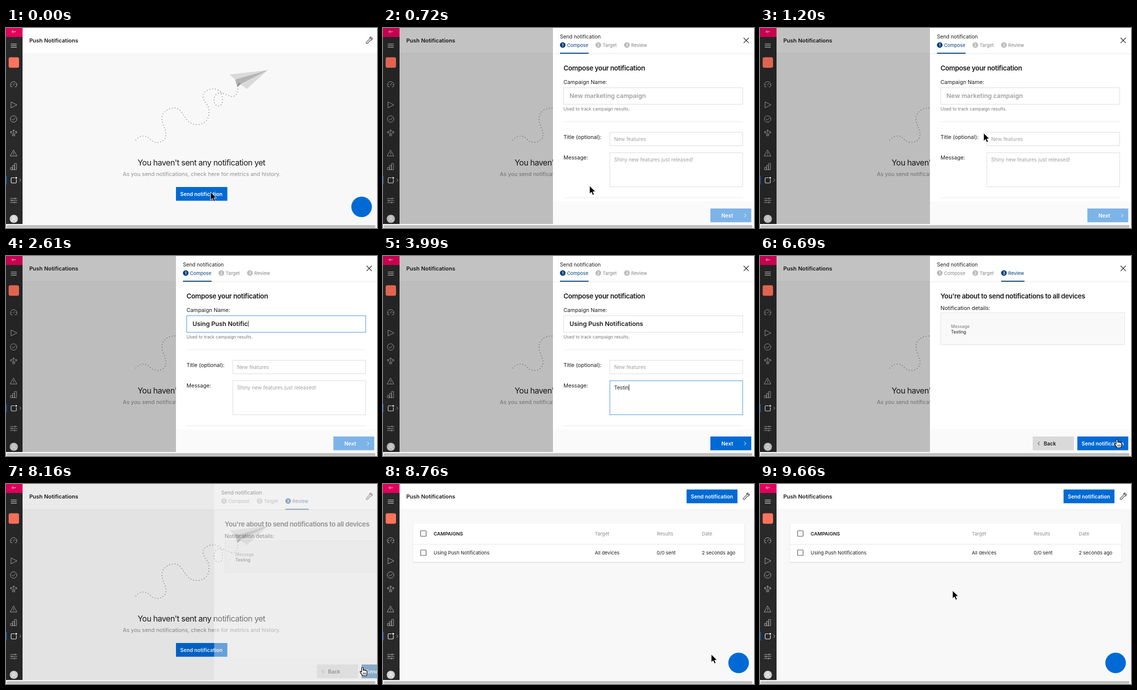
These frames come from a looping animation (740x400 px, 9.69 s). An HTML page:

```html
<!DOCTYPE html>
<html lang="en">
<head>
<meta charset="utf-8">
<title>Push Notifications</title>
<style>
  html, body { margin: 0; width: 100%; height: 100%; overflow: hidden; background: #fbfbfb; }
  svg { display: block; width: 740px; height: 400px; font-family: Inter, "Open Sans", sans-serif; }
  text { white-space: pre; }
  .line { fill: none; stroke-linecap: round; stroke-linejoin: round; }
</style>
</head>
<body>
<svg id="stage" viewBox="0 0 740 400"></svg>
<script>
const LOOP = 9690;
const BLUE = '#006ad4', DARK_BLUE = '#00417f', HOVER_BLUE = '#00539f', PALE_BLUE = '#7db4e8', FOCUS = '#4a98dc';
const INK = '#1c1c1c', GREY = '#8c8c8c', MUTED = '#777', PLACEHOLDER = '#a0a0a0', EDGE = '#dcdcdc';
const CAMPAIGN = 'Using Push Notifications', MESSAGE = 'Testing';

// Markup helpers
const text = (x, y, size, content, fill = INK, weight = 400, extra = '') =>
  `<text x="${x}" y="${y}" font-size="${size}" fill="${fill}" font-weight="${weight}" ${extra}>${content}</text>`;
const rect = (x, y, w, h, fill, extra = '') =>
  `<rect x="${x}" y="${y}" width="${w}" height="${h}" fill="${fill}" ${extra}/>`;
const circle = (x, y, r, fill, extra = '') => `<circle cx="${x}" cy="${y}" r="${r}" fill="${fill}" ${extra}/>`;
const line = (d, stroke, width = 1, extra = '') =>
  `<path class="line" d="${d}" stroke="${stroke}" stroke-width="${width}" ${extra}/>`;
const group = (id, content) => `<g id="${id}">${content}</g>`;
const box = (x, y, w, h, id = '') =>
  rect(x + .5, y + .5, w - 1, h - 1, '#fff', `stroke="${EDGE}" ${id && `id="${id}"`}`);
const button = (x, y, w, label, id = '') =>
  rect(x, y, w, 27.5, BLUE, id && `id="${id}"`) + text(x + 8.5, y + 17.6, 10.25, label, '#fff', 600);
const heading = (content, size = 13.4) =>
  text(360, 85.3, size, content, INK, 600, 'letter-spacing="-.36"');

function sidebar() {
  const icons = [
    'M10 117.5A6.5 6.5 0 1 1 20.5 117.5H18M15 114.5L17 110.5M10.5 113h1M19.5 113h1M12.5 117.5H10',
    'M10 148.2V159.8L21.5 154Z',
    'M12 182L14.4 184.4L18.6 179.6M21.7 182A6.5 6.5 0 1 1 8.7 182A6.5 6.5 0 1 1 21.7 182',
    'M15.2 216V204M13 206L15.2 203.6L17.4 206M13.2 216V213Q13 211 9.5 207.5M9.2 210.3V207.2H12.2M17.2 216V213Q17.5 211 21 207.5M18.3 207.2H21.3V210.3',
    'M15.2 244.3L21.8 256H8.6ZM15.2 248.5V252.3M15.2 254V254.2',
    'M9 283V279H13V283ZM13 283V275H17V283ZM17 283V271H21V283Z',
    'M8.5 341H22M8.5 345H22M8.5 349H22M18 339.5V342.5M12 343.5V346.5M17 347.5V350.5'
  ];
  return rect(0, 0, 33, 392, '#292929')
    + rect(0, 0, 33, 18, '#e3005c')
    + line('M19.5 7.5H12M14.7 4.8L12 7.5L14.7 10.2', '#ffd0d8')
    + line('M10 32H21M10 35.3H21M10 38.6H21', '#e4e4e4')
    + rect(5.3, 58.5, 20.7, 21, '#ff735c', 'rx="3.5"')
    + icons.map(d => line(d, '#b6b6b6', .9)).join('')
    + rect(0, 296, 1.5, 17, BLUE)
    + line('M17 299.5H12Q10.2 299.5 10.2 301.3V308.2Q10.2 310 12 310H19Q20.7 310 20.7 308.2V303', '#fff', 1.1)
    + circle(20.3, 299.8, 1.8, '#fff')
    + line('M27.3 301.7L29.7 304.3L27.3 307', '#c6c6c6', .9)
    + circle(15.6, 381.6, 8.2, '#d2d2d2')
    + circle(15.6, 379.5, 2.5, 'none', 'stroke="#fff"')
    + line('M11.3 387Q11.5 383 15.6 383Q19.7 383 19.9 387', '#fff');
}

function emptyPage() {
  const trail = 'M259 224C266 215 278 213 286 221C293 231 309 232 317 221C323 209 315 202 312 188'
    + 'C307 169 324 159 338 160C356 164 356 193 381 193C401 193 408 175 404 160'
    + 'C401 148 390 144 394 132C401 119 423 119 429 129C433 137 434 154 425 156'
    + 'C415 157 412 143 418 134C426 125 436 132 446 136C458 140 463 132 463 114';
  return line(trail, '#82828a', 1.7, 'stroke-dasharray="0 5.6"')
    + '<path d="M446 93L522.5 84L457 103Z" fill="#dadada"/><path d="M522.5 84L480.5 122L467 112Z" fill="#dadada"/>'
    + '<path d="M457 103L522.5 84L468 112L461 117.5Z" fill="#b4b4b4"/><path d="M461 117.5L464 109.5L469 112Z" fill="#8e8e8e"/>'
    + text(262.5, 275, 16, "You haven't sent any notification yet", INK, 400, 'letter-spacing="-.53"')
    + text(233, 295.7, 10.88, 'As you send notifications, check here for metrics and history.', '#909090')
    + button(339, 318, 102.5, 'Send notification');
}

function listPage() {
  const checkbox = y => rect(75, y, 11, 11, '#fff', 'stroke="#555" stroke-width="1.2" rx="1"');
  const row = (y, fill, cells) => [422.5, 546, 636].map((x, i) => text(x, y, 9.6, cells[i], fill)).join('');
  return button(605.5, 11, 101.5, 'Send notification')
    + rect(59, 80, 663, 78, '#e9e9e9', 'rx="1"') + rect(60, 80, 661, 75.5, '#fff')
    + line('M60 120.5H721', '#e6e6e6')
    + checkbox(93.5) + checkbox(132)
    + text(101, 103.2, 9.6, 'CAMPAIGNS', INK, 600) + row(103.2, GREY, ['Target', 'Results', 'Date'])
    + text(101, 141.4, 9.6, CAMPAIGN) + row(141.4, INK, ['All devices', '0/0 sent', '2 seconds ago']);
}

function tabs() {
  return [['Compose', 353, 410], ['Target', 424, 467], ['Review', 481, 527.5]].map(([name, x, end], i) =>
    `<g class="tab">${circle(x + 5.5, 34, 5.6, '#b9b9b9')}`
    + text(x + 5.5, 36.9, 7.8, i + 1, '#fff', 600, 'text-anchor="middle"')
    + text(x + 14, 37.6, 9.4, name, '#858585', 400, 'class="name"')
    + rect(x, 49.5, end - x, 2, DARK_BLUE, 'class="bar"') + '</g>').join('');
}

function panel() {
  const backButton = x => rect(x, 361, 82, 27.5, '#d9d9d9')
    + line(`M${x + 13.5} 371.8L${x + 10.5} 375L${x + 13.5} 378.2`, '#333') + text(x + 22, 378.8, 10.2, 'Back', INK, 600);
  const nextButton = rect(653, 361, 81.5, 27.5, BLUE, 'id="next"') + text(675, 378.8, 10.3, 'Next', '#fff', 600)
    + line('M720.8 371.8L723.8 375L720.8 378.2', '#fff');
  const radios = ['All registered devices', 'Custom device list', 'Audience'].map((label, i) => {
    const y = 109.3 + i * 22.5;
    return circle(366.5, y, 5.6, '#fff', `stroke="${i ? '#666' : BLUE}" stroke-width="1.3"`)
      + (i ? '' : circle(366.5, y, 3.3, BLUE)) + text(380, y + 3.9, 10.8, label);
  }).join('');

  const compose = heading('Compose your notification')
    + text(360, 112.4, 10.7, 'Campaign Name:') + box(360, 119, 358, 34, 'campaignBox')
    + text(372, 140.2, 12.35, '', INK, 600, 'id="campaign"')
    + text(360, 165.2, 8.8, 'Used to track campaign results.', MUTED)
    + line('M360 187.5H717M360 339.5H717', '#e8e8e8')
    + text(360, 222.3, 10.7, 'Title (optional):') + box(452, 208, 266, 28)
    + text(461, 226, 10.1, 'New features', PLACEHOLDER)
    + text(360, 263.3, 10.7, 'Message:') + box(452, 249, 266, 69, 'messageBox')
    + text(461, 267, 10.1, '', INK, 400, 'id="message"')
    + rect(0, 0, 1, 12, INK, 'id="caret"');
  const target = heading('Who are you sending this notification to?', 13.9) + radios + backButton(564);
  const review = heading("You're about to send notifications to all devices")
    + text(360, 108.4, 10.9, 'Notification details:')
    + rect(360.5, 113.5, 367, 64, '#f9f9f9', 'stroke="#e4e4e4"')
    + text(381, 144.2, 8.6, 'Message', MUTED) + text(381, 155, 8.75, MESSAGE)
    + backButton(544) + button(633, 361, 101.5, 'Send notification', 'send');

  return rect(339, 0, 401, 392, '#fff') + rect(339, 346.5, 401, 45.5, '#fafafa')
    + line('M339 51.5H740', '#e9e9e9')
    + text(353, 21, 10.2, 'Send notification') + tabs()
    + line('M719.7 20L729.3 29.6M729.3 20L719.7 29.6', '#222', 1.2)
    + group('step0', compose) + group('step1', target) + group('step2', review)
    + group('nextGroup', nextButton);
}

const arrow = '<path d="M0 0V16.2L3.8 12.8L6.4 18.8L9.3 17.5L6.7 11.8H11.8Z" fill="#000" stroke="#fff" stroke-width="1"/>';
const hand = '<path d="M-1.6 1Q-1.4 -.6 0 -.4Q1.3 -.3 1.5 1V5.5Q3 4.3 4.3 5.7Q5.8 5 6.9 6.5Q9 6 9.2 8V12Q9 14 7.8 16.5H.2Q-1 14 -3.6 11Q-5.6 8.3 -4 7.6Q-2.8 7.4 -1.6 9Z"'
  + ' fill="#fff" stroke="#000" stroke-width="1.2"/><path class="line" d="M1.7 10.5V14M4 10.5V14M6.3 10.5V14" stroke="#000" stroke-width=".9"/>';

const stage = document.getElementById('stage');
stage.innerHTML = rect(33, 51, 707, 341, '#f8f8f8')
  + rect(33, 0, 707, 51, '#fff') + line('M33 51.5H740', '#efefef')
  + text(46.5, 28.6, 11, 'Push Notifications', INK, 600)
  + line('M719 28.2L725 22.3Q724.3 18.8 727.5 18.1L729 18.2L726.8 20.6L728.3 22.2L730.8 20Q731.4 24.5 726.8 24.7L721.3 30.5Q719.8 31.8 718.7 30.7Q717.8 29.6 719 28.2Z', '#444', 1.1)
  + group('empty', emptyPage()) + group('list', listPage())
  + circle(709.3, 357.7, 20.5, BLUE, 'id="launcher"')
  + sidebar()
  + group('shade', rect(0, 0, 33, 392, '#000', 'opacity=".12"') + rect(33, 0, 707, 392, '#000', 'opacity=".24"'))
  + group('panel', panel())
  + rect(0, 392, 740, 8, '#fbfbfb') + rect(1, 394.3, 736, 5.2, '#bebebe', 'rx="2.6"')
  + group('arrow', arrow) + group('hand', hand);

const el = id => document.getElementById(id);
const show = (id, on) => { el(id).style.display = on ? '' : 'none'; };
const clamp = v => Math.max(0, Math.min(1, v));
const progress = (t, from, to) => clamp((t - from) / (to - from));
const ease = p => p * p * (3 - 2 * p);

// Pointer stops: time, x, y
const stops = [
  [0, 408, 328], [600, 408, 328], [1200, 446, 210], [1450, 455, 138], [3050, 455, 138], [3400, 480, 275],
  [4200, 480, 275], [4750, 678, 370], [6050, 678, 370], [6500, 712, 367], [8150, 711, 367],
  [8550, 711, 367], [9350, 384, 213], [LOOP, 384, 213]
];

function pointerAt(t) {
  const i = stops.findIndex(s => s[0] > t);
  const [t0, x0, y0] = stops[i - 1], [t1, x1, y1] = stops[i];
  const p = ease(progress(t, t0, t1));
  return [x0 + (x1 - x0) * p, y0 + (y1 - y0) * p];
}

function typeInto(id, value, placeholder, p) {
  const typed = value.slice(0, Math.floor(p * value.length + 1e-6));
  el(id).textContent = typed || placeholder;
  el(id).setAttribute('fill', typed ? INK : PLACEHOLDER);
  return typed;
}

function render(t) {
  const shown = ease(progress(t, 400, 700)) * (1 - ease(progress(t, 8010, 8310)));
  const open = t >= 400 && t < 8310;
  const step = t < 5050 ? 0 : t < 6050 ? 1 : 2;

  show('panel', open);
  el('panel').setAttribute('opacity', shown ** 1.3);
  el('panel').setAttribute('transform', `translate(${(1 - shown) * 151} 0)`);
  el('shade').setAttribute('opacity', shown ** 1.5);
  show('launcher', !open);
  show('empty', t < 8640);
  show('list', t >= 8640);

  [0, 1, 2].forEach(i => show('step' + i, i === step));
  show('nextGroup', step < 2);
  document.querySelectorAll('.tab').forEach((tab, i) => {
    const active = i === step;
    tab.querySelector('circle').setAttribute('fill', active ? DARK_BLUE : '#b9b9b9');
    tab.querySelector('.name').setAttribute('fill', active ? DARK_BLUE : '#858585');
    tab.querySelector('.bar').style.display = active ? '' : 'none';
  });

  const campaign = typeInto('campaign', CAMPAIGN, 'New marketing campaign', progress(t, 1550, 2950));
  const message = typeInto('message', MESSAGE, 'Shiny new features just released!', progress(t, 3450, 4060));
  const onCampaign = t >= 1450 && t < 3400, onMessage = t >= 3400 && t < 5050;
  el('campaignBox').setAttribute('stroke', onCampaign ? FOCUS : EDGE);
  el('messageBox').setAttribute('stroke', onMessage ? FOCUS : EDGE);
  show('caret', onCampaign || onMessage);
  if (onCampaign || onMessage) {
    const field = el(onCampaign ? 'campaign' : 'message');
    const width = (onCampaign ? campaign : message) ? field.getComputedTextLength() : 0;
    el('caret').setAttribute('x', (onCampaign ? 372 : 461) + width + .5);
    el('caret').setAttribute('y', onCampaign ? 129.5 : 257.3);
  }

  const [x, y] = pointerAt(t);
  const overButton = t >= 4650 && t < 8600;
  const typing = t >= 1400 && t < 3050 || t >= 3350 && t < 4200;
  el('next').setAttribute('fill', !message ? PALE_BLUE : overButton ? HOVER_BLUE : BLUE);
  el('send').setAttribute('fill', t >= 7800 ? HOVER_BLUE : BLUE);
  show('arrow', !overButton && !typing);
  show('hand', overButton);
  el(overButton ? 'hand' : 'arrow').setAttribute('transform', `translate(${x} ${y})`);
}

function tick() {
  render(performance.now() % LOOP);
  requestAnimationFrame(tick);
}
tick();
</script>
</body>
</html>
```
